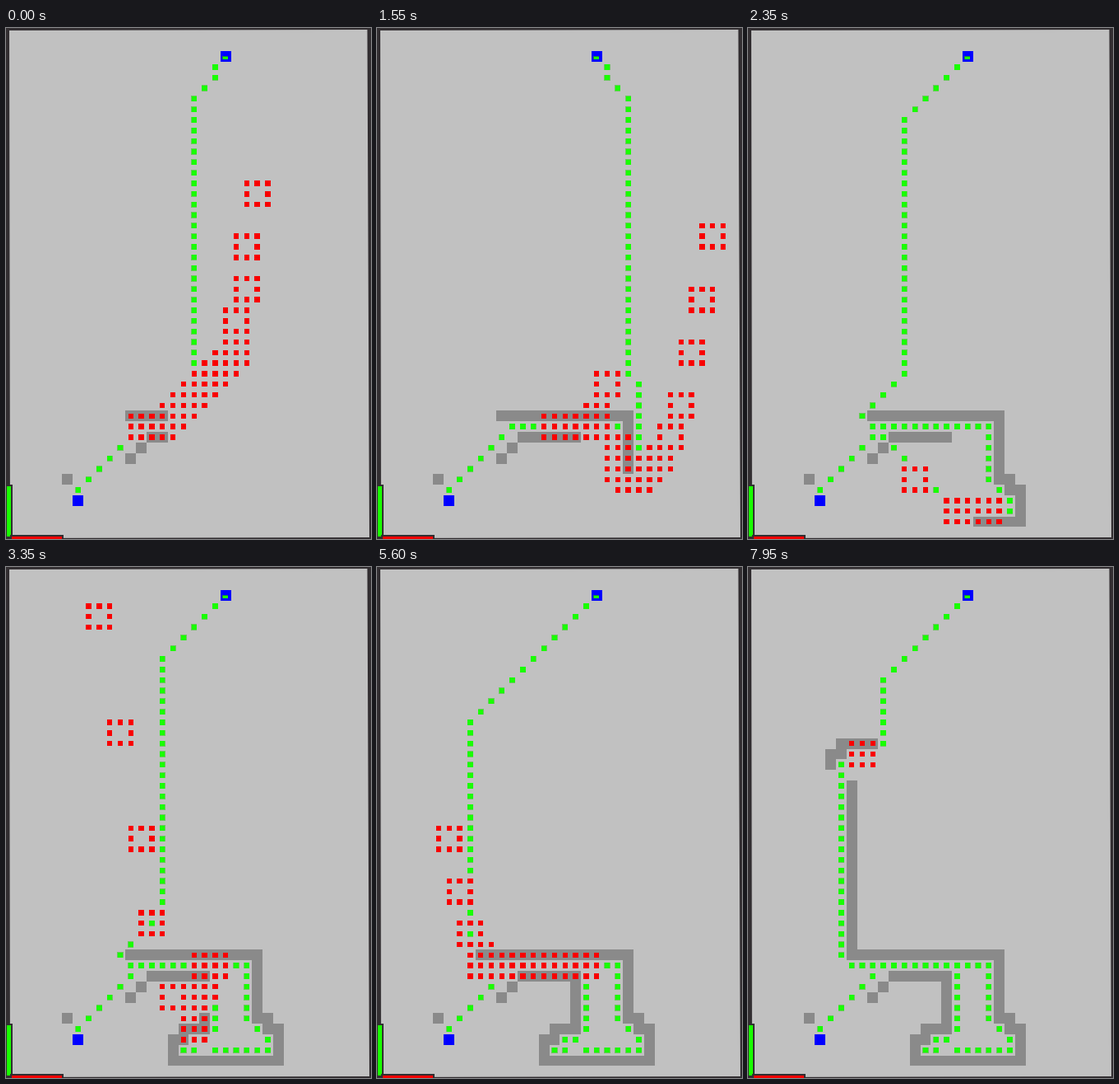
Recreate the animation shown at these times as a matplotlib script. Size 444 by 620 pixels, loop 8 s.

```python
import random

import matplotlib.pyplot as plt
from matplotlib.animation import FuncAnimation
from matplotlib.collections import PolyCollection
from matplotlib.patches import Polygon, Rectangle

W, H, DPI = 444, 620, 100
STEP, LOOP = 50, 8000
PITCH_X, PITCH_Y = 12.82, 12.83
X0, Y0 = 10.8, 8.9
COLS, ROWS = 34, 48
START, GOAL = (20, 2), (6, 44)
GREEN, RED, BLUE = "#19ff00", "#f80000", "#0000ff"
BOARD, WALL, DARK = "#c1c1c1", "#8a8a8a", "#322e31"


def line(*pts):
    """Grid cells along a polyline, each cell once."""
    cells = [pts[0]]
    for (ax, ay), (bx, by) in zip(pts, pts[1:]):
        n = max(abs(bx - ax), abs(by - ay))
        cells += [(ax + round((bx - ax) * i / n), ay + round((by - ay) * i / n))
                  for i in range(1, n + 1)]
    return cells


def throw(a, b, n):
    """Accelerating flick: even steps sideways, growing steps upwards."""
    return [(round(a[0] + (b[0] - a[0]) * i / n),
             round(a[1] + (b[1] - a[1]) * (i / n) ** 1.5)) for i in range(1, n + 1)]


def ramp(t, a, b):
    return min(1, max(0, (t - a) / (b - a)))


# --- walls: a pen lays one cell after another at a steady pace ---
def stroke(start, pace, *corners):
    return [(start + pace * i, c) for i, c in enumerate(line(*corners))]


FLOOR_AT, FLOOR_PACE = 1220, 75
SIDE_AT = 5500
HOOK_AT, HOOK_PACE = 7600, 58

WALLS = sorted(
    stroke(-900, 0, (5, 42))
    + stroke(-900, 0, (12, 39), (11, 40))
    + stroke(-350, 115, (11, 36), (23, 36))
    + stroke(-115, 115, (13, 38), (18, 38))
    + stroke(FLOOR_AT, FLOOR_PACE, (23, 37), (23, 42), (24, 42), (24, 43), (25, 43),
             (25, 46), (15, 46), (15, 44), (16, 44), (16, 43), (18, 43), (18, 39))
    + stroke(SIDE_AT, 100, (10, 36), (9, 36), (9, 20))
    + stroke(HOOK_AT, HOOK_PACE, (7, 18), (7, 17), (8, 17), (8, 16), (11, 16)))


# --- route: diagonal from the start to column k, straight down, round the walls ---
HOME = line((11, 38), (10, 39), (6, 43))
POCKET = line((11, 37), (22, 37), (22, 42), (24, 44), (24, 45), (19, 45))
SHORTCUT = line((12, 38), (18, 44))
INNER = line((19, 38), (19, 43), (18, 44), (17, 44), (16, 45), (17, 45))


def top(k, drop):
    x = START[0] + (1 if k >= START[0] else -1)
    y = START[1] + 1
    return [(x, y), (x, y + drop), (k, y + drop + abs(k - x))]


def route(t):
    if t < 1850:
        k = min(23, 17 + t // 170)
        if t < FLOOR_AT:
            way = [(k, 36), (k - 1, 37)]
        else:
            end = min(41, 37 + (t - FLOOR_AT) // FLOOR_PACE)
            way = [(k, 32), (k + 1, 33), (k + 1, end), (k, end + 1),
                   (k - 1, end), (k - 1, 37)]
        return line(*top(k, 1), *way, (12, 37)) + HOME

    k, edge = (14, 10) if t < SIDE_AT else (8, 8)
    way = [(k, 36 - k + edge), (edge, 36), (edge + 1, 37), (11, 37)]
    hooked = t - HOOK_AT - 3 * HOOK_PACE
    if hooked >= 0:
        k = 9 + hooked // HOOK_PACE
        way = [(k, 16), (k - 1, 17), (9, 17), (8, 18)] + way[1:]
    extra = SHORTCUT if t < 3000 else INNER
    return line(*top(k, 0), *way) + POCKET + extra + HOME


# --- update trails: (peak ms, walked cells, thrown cells) ---
def trail(peak, walk, target=None, n=5):
    walked = line(*walk)
    return peak, walked, throw(walked[-1], target, n) if target else []


TRAILS = [
    trail(0, [(12, 37), (14, 37), (20, 31)], (23, 15)),
    trail(700, [(18, 37), (20, 37), (20, 36), (21, 36), (21, 33), (22, 33),
                (22, 26), (23, 23), (23, 16)]),
    trail(1550, [(16, 37), (20, 37), (20, 36)], (21, 33), 1),
    trail(1550, [(22, 39), (22, 41), (23, 42), (24, 42), (26, 40)], (31, 19)),
    trail(2500, [(22, 45), (19, 45)], (4, 21), 4),
    trail(4450, [(19, 43), (19, 38), (18, 37)]),
    (4450, [], throw((6, 6), (12, 0), 3)),
    trail(7950, [(10, 17)]),
]

# between those, each wave runs from the corridor to the pen and is flicked away
rng = random.Random(5)
for peak in [1050, 2000, *range(2850, 4000, 350), *range(4850, 6500, 400), 7200]:
    tip = [c for when, c in WALLS if when <= peak][-1]
    side = (25, 31) if peak < 2100 else (1, 9)
    target = rng.randint(*side), rng.randint(1, 8) + (11 if peak > 5000 else 0)
    hub = (19, 37)
    TRAILS.append(trail(peak, [hub, (tip[0], hub[1]), tip], target if peak < 7000 else None))


def red_cells(t):
    """Walked cells mark a full 3x3 block, thrown ones only its ring."""
    out = set()
    for peak, walked, thrown in TRAILS:
        cells = walked + thrown
        head = round(len(cells) * ramp(t, peak - 350, peak))
        tail = round(len(cells) * ramp(t, peak + 50, peak + 300))
        for n in range(tail, head):
            x, y = cells[n]
            out |= {(x + i, y + j) for i in (-1, 0, 1) for j in (-1, 0, 1)
                    if i or j or n < len(walked)}
    return {(x, y) for x, y in out if 0 <= x < COLS and 0 <= y < ROWS}


# --- drawing ---
def box(cell, share=1.0, snap=False):
    x, y = X0 + PITCH_X * cell[0], Y0 + PITCH_Y * cell[1]
    dx, dy = PITCH_X * share / 2, PITCH_Y * share / 2
    l, u, r, d = x - dx, y - dy, x + dx, y + dy
    if snap:
        l, u, r, d = map(round, (l, u, r, d))
    return [(l, u), (r, u), (r, d), (l, d)]


fig = plt.figure(figsize=(W / DPI, H / DPI), dpi=DPI, facecolor=DARK)
ax = fig.add_axes([0, 0, 1, 1])
ax.set_xlim(0, W)
ax.set_ylim(H, 0)
ax.axis("off")


def rect(x, y, w, h, color):
    ax.add_patch(Rectangle((x, y), w, h, fc=color, lw=0, zorder=6))


def layer(color, z):
    return ax.add_collection(PolyCollection([], facecolors=color, linewidths=0, zorder=z))


ax.add_patch(Polygon([(4, 3), (439.5, 2), (442, 618), (5, 619)], fc=BOARD, lw=0, zorder=0))
rect(0, 554, 8, 65, DARK)
rect(1, 556, 5, 61, GREEN)
rect(5, 615, 65, 5, DARK)
rect(7, 617, 61, 3, RED)
for cell in (START, GOAL):
    ax.add_patch(Polygon(box(cell), fc=BLUE, lw=0, zorder=5))
rect(263, 34, 7, 4, "#1a7a50")
rect(264, 35, 6, 3, GREEN)

walls = layer(WALL, 1)
rims = layer("#6cc75f", 2)
greens = layer(GREEN, 3)
reds = layer(RED, 4)


def draw(frame):
    t = frame * STEP
    solid = {c for when, c in WALLS if when <= t}
    hot = red_cells(t)
    path = sorted(set(route(t)) - solid - hot)
    walls.set_verts([box(c, snap=True) for c in sorted(solid)])
    rims.set_verts([box(c, 0.56) for c in path])
    greens.set_verts([box(c, 0.49) for c in path])
    reds.set_verts([box(c, 0.5) for c in sorted(hot)])
    return walls, rims, greens, reds


anim = FuncAnimation(fig, draw, frames=LOOP // STEP, interval=STEP, repeat=True,
                     repeat_delay=0, blit=False)
plt.show()
```
